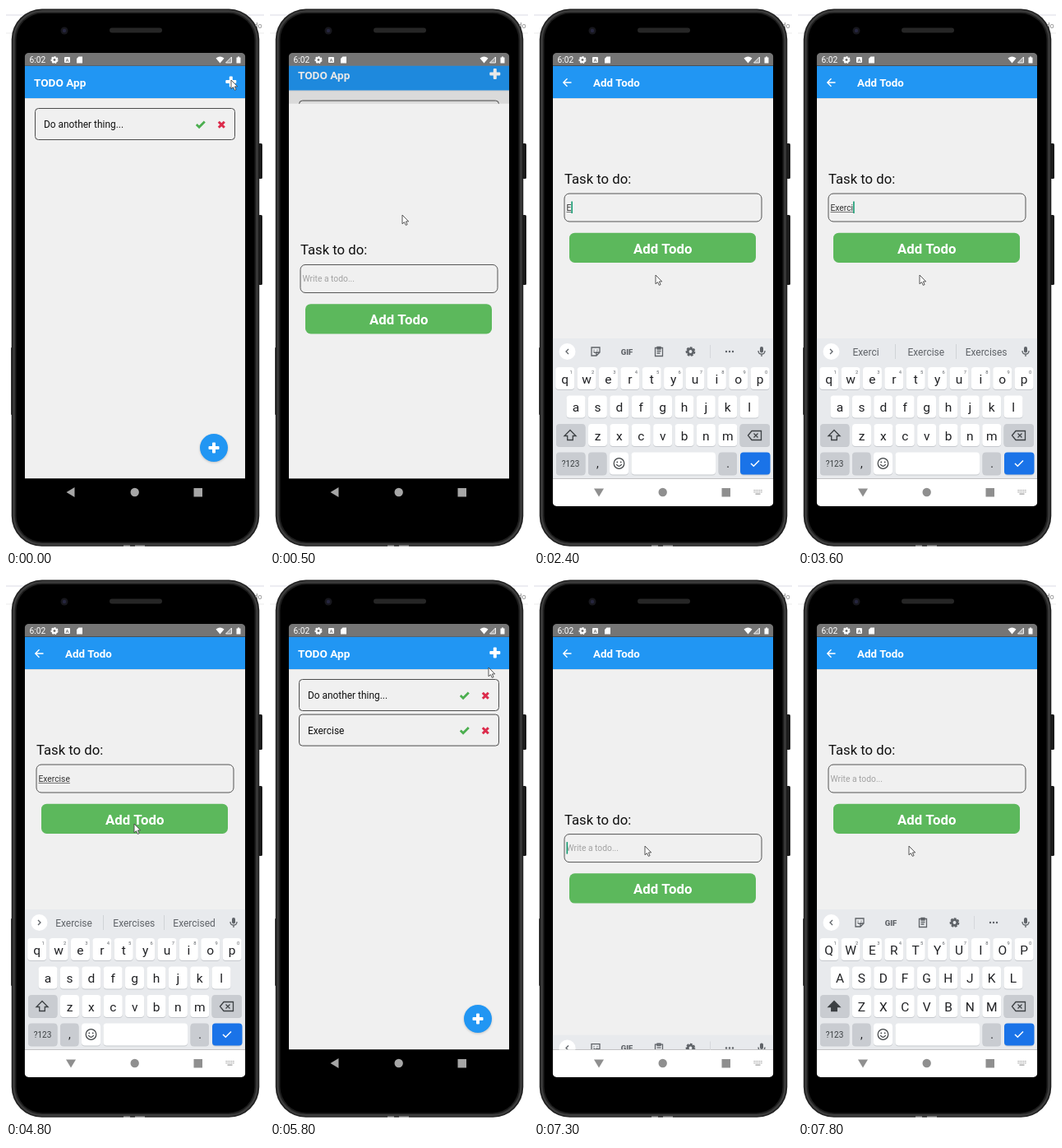
Animation, 314 px wide and 660 px high, one loop 8 s. Source, as an HTML page with a canvas:

```html
<!DOCTYPE html>
<html lang="en">
<head>
<meta charset="utf-8">
<title>Todo app demo</title>
<style>
  html, body { margin: 0; width: 100%; height: 100%; overflow: hidden; background: #fff; }
  canvas { display: block; width: 314px; height: 660px; }
</style>
</head>
<body>
<canvas id="stage"></canvas>
<script>
const LOOP = 8000, LEFT = 22.7, WIDTH = 268.6, TOP = 72.5, CARD = 502;
const BLUE = '#2196f3', PAGE = '#f0f0f0', ICON = '#5f6368';
const canvas = document.getElementById('stage');
const c = canvas.getContext('2d');
const dpr = window.devicePixelRatio || 1;
canvas.width = 314 * dpr;
canvas.height = 660 * dpr;

const visits = [
  { open: 300, focus: 1100, keys: 1200, close: 5050 },
  { open: 6268, focus: 7200, keys: 7250, close: 1e9 }
];
const typed = 'Exercise';
const typeTimes = [2400, 2600, 2950, 3300, 3450, 3600, 3700, 3900];
// time, x, y
const pointer = [
  [0, 274, 90], [200, 274, 90], [450, 161, 254], [600, 161, 254], [900, 148, 327],
  [4250, 148, 327], [4600, 156, 300], [5150, 156, 300], [5600, 238, 136],
  [5800, 266, 110], [6000, 271, 102], [6550, 271, 102], [7000, 135, 327]
];

const clamp = v => Math.max(0, Math.min(1, v));
const smooth = v => v * v * (3 - 2 * v);

// cubic-bezier(.35, .45, 0, 1)
function ease(x) {
  if (x <= 0 || x >= 1) return clamp(x);
  let lo = 0, hi = 1, s;
  for (let i = 0; i < 20; i++) {
    s = (lo + hi) / 2;
    if (1.05 * (1 - s) ** 2 * s + s ** 3 < x) lo = s; else hi = s;
  }
  return 1.35 * (1 - s) ** 2 * s + 3 * (1 - s) * s * s + s ** 3;
}

function rect(x, y, w, h, fill) {
  c.fillStyle = fill;
  c.fillRect(x, y, w, h);
}
function round(x, y, w, h, r, fill, stroke, width = 1) {
  c.beginPath();
  c.roundRect(x, y, w, h, r);
  paint(fill, stroke, width);
}
function circle(x, y, r, fill, stroke, width = 1) {
  c.beginPath();
  c.arc(x, y, r, 0, 7);
  paint(fill, stroke, width);
}
function shape(d, x, y, fill, stroke, width = 1) {
  c.save();
  c.translate(x, y);
  const p = new Path2D(d);
  if (fill) { c.fillStyle = fill; c.fill(p); }
  if (stroke) { c.strokeStyle = stroke; c.lineWidth = width; c.stroke(p); }
  c.restore();
}
function paint(fill, stroke, width) {
  if (fill) { c.fillStyle = fill; c.fill(); }
  if (stroke) { c.strokeStyle = stroke; c.lineWidth = width; c.stroke(); }
}
function text(s, x, y, size, color, weight = 400, align = 'left') {
  c.font = `${weight} ${size}px Roboto, sans-serif`;
  c.textAlign = align;
  c.fillStyle = color;
  c.fillText(s, x, y);
}
function gear(x, y, r, color) {
  c.setLineDash([r * 0.5, r * 0.285]);
  circle(x, y, r * 0.88, null, color, r * 0.3);
  c.setLineDash([]);
  circle(x, y, r * 0.58, null, color, r * 0.48);
}
function plus(x, y) {
  round(x - 6.5, y - 2, 13, 4, 1, '#fff');
  round(x - 2, y - 6.5, 4, 13, 1, '#fff');
}

function phone() {
  rect(0, 0, 314, 660, '#fff');
  rect(0, 10.5, 314, 1, '#dcdce6');
  rect(0, 32.5, 314, 1, '#ececec');
  text('do', 301.5, 27, 9, '#888');
  round(306, 167, 6, 43, 1.5, '#1b1b1b');
  round(306, 254, 6, 85, 1.5, '#1b1b1b');
  round(6, 415, 4, 82, 1, '#3a3a3a');
  round(6.7, 3.6, 301.6, 653.2, 37, '#1e1e1e');
  round(9.5, 6.2, 296, 648, 34.5, null, '#3c3c3c', 2.4);
  round(12.5, 9, 290, 642.5, 32, '#000');
  rect(143, 655.5, 8, 1.5, '#aaa');
  rect(157, 655.5, 12, 1.5, '#aaa');
  circle(71, 30, 4.5, '#17171d');
  circle(71, 30, 2.2, '#26263f');
  round(126, 26.5, 64, 6, 3, '#262626');
}

function statusBar() {
  rect(LEFT, 57, WIDTH, TOP - 57, '#757575');
  text('6:02', 28.5, 69, 10.2, '#fff');
  gear(59, 65.5, 4.4, '#fff');
  round(71, 62, 7, 7, 1, '#fff');
  text('A', 74.5, 68, 6, '#757575', 700, 'center');
  shape('M-3.5 -1.5L-1 -4H3.5V4H-3.5Z', 89.5, 65.5, '#fff');
  shape('M0 4L-5 -2Q0 -6 5 -2Z', 260.5, 65.5, '#fff');
  shape('M-3.5 3.5L3.5 -3.5V3.5Z', 271, 65.5, 'rgba(255,255,255,.35)', '#fff', 0.9);
  shape('M-2.5 -3H-1V-4H1V-3H2.5V4H-2.5Z', 283, 65.5, '#fff');
}

function header(title, x, size) {
  rect(LEFT, 112, WIDTH, 1, '#dedede');
  rect(LEFT, TOP, WIDTH, 112 - TOP, BLUE);
  text(title, x, 98, size, '#fff', 700);
}

function todo(label, y) {
  round(35.5, y + 0.5, 243, 38, 4, null, '#4c4c4c');
  text(label, 46, y + 24.2, 11.9, '#111');
  shape('M-5 0L-1.7 3.2L5 -3.5', 236.8, y + 20, null, '#4caf50', 2.8);
  shape('M-3.5 -3.5L3.5 3.5M3.5 -3.5L-3.5 3.5', 262.3, y + 20.2, null, '#dc2b4b', 3);
}

function listCard(t, p) {
  c.save();
  c.translate(0, -0.0208 * CARD * p);
  rect(LEFT, TOP, WIDTH, CARD + 20, PAGE);
  header('TODO App', 34, 13.6);
  const pressed = visits.some(v => t >= v.open - 180 && t < v.open);
  c.globalAlpha = pressed ? 0.5 : 1;
  plus(273.8, 92);
  c.globalAlpha = 1;
  todo('Do another thing...', 124);
  if (t > 5000) todo('Exercise', 166.6);
  c.save();
  c.shadowColor = 'rgba(0,0,0,.2)';
  c.shadowBlur = 3 * dpr;
  c.shadowOffsetY = dpr;
  circle(253, 537, 17, BLUE);
  c.restore();
  plus(253, 537);
  c.restore();
  rect(LEFT, TOP, WIDTH, CARD, `rgba(0,0,0,${0.1 * p})`);
}

function formCard(t, p, visit, value, lifted) {
  c.save();
  c.beginPath();
  c.rect(LEFT, TOP + CARD * (1 - p), WIDTH, CARD);
  c.clip();
  c.translate(0, 0.041 * CARD * (1 - p));
  rect(LEFT, TOP, WIDTH, CARD, PAGE);
  header('Add Todo', 72, 13.3);
  shape('M5 0H-4.5M0 -4.7L-4.7 0L0 4.7', 40.5, 93, null, '#fff', 1.4);
  if (!lifted) c.translate(0, 84.6);

  text('Task to do:', 37, 216, 16.7, '#111');
  round(37, 228, 240, 34, 6, null, '#555');
  text(value || 'Write a todo...', 39.5, 248.5, 10.3, value ? '#333' : '#a2a2a2');
  const w = value ? c.measureText(value).width : 0;
  if (value) rect(39.5, 250, w, 0.8, '#555');
  const since = Math.max(visit.focus, ...typeTimes.filter(k => k <= t && value));
  if (t >= visit.focus && t < visit.close && (t - since) % 1000 < 500)
    rect(39.5 + w, 237.5, 1.6, 14.5, '#149a70');

  c.globalAlpha = t > 4850 && t < 5150 ? 0.5 : 1;
  round(43, 275.7, 227, 36.3, 6.5, '#5cb85c');
  text('Add Todo', 156.7, 300.7, 16.8, '#fff', 700, 'center');
  c.restore();
}

function key(x, y, w, fill = '#fff') {
  round(x, y + 1, w, 27, 4, '#c6c9ce');
  round(x, y, w, 27, 4, fill);
}

function keyRow(letters, x0, y, upper, digits) {
  [...letters].forEach((ch, i) => {
    const x = x0 + i * 26.38;
    key(x - 11.5, y, 23);
    text(upper ? ch.toUpperCase() : ch, x, y + 19.5, 15.5, '#202124', 400, 'center');
    if (digits) text((i + 1) % 10, x + 7.5, y + 7.5, 5.8, ICON, 400, 'center');
  });
}

function toolbar() {
  shape('M-5 -5H5V1L1 5H-5ZM5 1H1V5M-2.5 0Q0 3 2 0M-2 -2.2V-1.2M2 -2.2V-1.2', 75, 420, null, ICON, 1.3);
  text('GIF', 113, 423.5, 9.5, ICON, 900, 'center');
  shape('M-4.5 -4.5H4.5V5.5H-4.5ZM-2 -5.5H2V-3H-2ZM-2.5 -.5H2.5M-2.5 2H1.5', 152, 420, null, ICON, 1.3);
  gear(190.5, 420, 5.7, ICON);
  rect(214, 412, 1, 16, '#d5d7db');
  for (const x of [234, 238, 242]) circle(x, 420, 1.2, ICON);
}

function suggestions(value) {
  const words = value === typed ? [typed, 'Exercises', 'Exercised'] : [value, typed, 'Exercises'];
  words.forEach((s, i) => text(s, 82.5 + i * 73.3, 424.5, 12, ICON, 400, 'center'));
  rect(118, 411, 1, 18, '#d0d3d7');
  rect(192, 411, 1, 18, '#d0d3d7');
}

function keyboard(value) {
  const upper = !value, predict = value.length > 1, grey = '#c9ccd1';
  rect(LEFT, 404, WIDTH, 171, '#e8eaed');
  circle(40.5, 420, 10, '#fff');
  shape(predict ? 'M-1.5 -3L1.5 0L-1.5 3' : 'M1.5 -3L-1.5 0L1.5 3', 40.5, 420, null, ICON, 1.3);
  if (predict) suggestions(value); else toolbar();
  round(275, 414, 4, 7.5, 2, ICON);
  shape('M-4 -1Q-4 3.2 0 3.2Q4 3.2 4 -1M0 3V6', 277, 420, null, ICON, 1.3);

  keyRow('qwertyuiop', 37.7, 439, upper, true);
  keyRow('asdfghjkl', 51, 473.5, upper);
  keyRow('zxcvbnm', 77.5, 508, upper);
  key(27, 508, 35.5, grey);
  shape('M0 -6.5L7 .5H3.3V5.5H-3.3V.5H-7Z', 44, 522, upper ? '#3c4043' : null, '#3c4043', 1.3);
  key(250.5, 508, 36.5, grey);
  shape('M-8 0L-3.5 -5.5H8V5.5H-3.5ZM-1 -2.5L4 2.5M4 -2.5L-1 2.5', 268.5, 522, null, '#3c4043', 1.3);

  key(27, 542.5, 35.5, grey);
  text('?123', 44.5, 560, 10, '#3c4043', 400, 'center');
  key(66, 542.5, 22.5, grey);
  text(',', 77.5, 561, 14, '#202124', 400, 'center');
  key(92, 542.5, 23);
  circle(103.5, 556, 6.3, null, '#3c4043', 1.2);
  shape('M-3.2 1.2Q0 5.5 3.2 1.2', 103.5, 556, null, '#3c4043', 1.2);
  circle(101.3, 554.3, 0.9, '#3c4043');
  circle(105.7, 554.3, 0.9, '#3c4043');
  key(118.5, 542.5, 102.5);
  key(224.5, 542.5, 22.5, grey);
  text('.', 236, 561, 14, '#202124', 400, 'center');
  key(251, 542.5, 36.5, '#1a73e8');
  shape('M-5 0L-1.7 3.2L5 -3.5', 269, 556, null, '#fff', 1.5);
}

function navBar(light) {
  rect(LEFT, TOP + CARD, WIDTH, 35, light ? '#fff' : '#000');
  const color = light ? '#8f8f8f' : '#a6a6a6';
  shape(light ? 'M-6 -4.5H6L0 5.5Z' : 'M4.5 -6V6L-5.5 0Z', 79, 591, color);
  circle(156.7, 591, 5.2, color);
  rect(228.5, 586, 10.5, 10.5, color);
  if (!light) return;
  for (let i = 0; i < 5; i++) {
    rect(267.5 + i * 2.2, 588, 1.2, 1.2, '#999');
    rect(267.5 + i * 2.2, 590.2, 1.2, 1.2, '#999');
  }
  rect(269.5, 592.5, 6, 1.2, '#999');
}

function mouse(t) {
  let i = pointer.findIndex(k => k[0] > t);
  if (i < 0) i = pointer.length;
  const a = pointer[i - 1], b = pointer[i] || a;
  const f = b === a ? 0 : smooth((t - a[0]) / (b[0] - a[0]));
  shape('M0 0V10.8L2.5 8.6L4.3 12.4L6.1 11.6L4.4 7.9H7.7Z',
    a[1] + (b[1] - a[1]) * f, a[2] + (b[2] - a[2]) * f, '#fff', '#444', 0.9);
}

function draw(t) {
  c.setTransform(dpr, 0, 0, dpr, 0, 0);
  phone();
  const visit = visits[t < 6000 ? 0 : 1];
  const p = ease((t - visit.open) / 425) - ease((t - visit.close) / 425);
  const keys = smooth(clamp((t - visit.keys) / 250)) - smooth(clamp((t - visit.close) / 200));
  const value = t < 6000 ? typed.slice(0, typeTimes.filter(k => k <= t).length) : '';

  c.save();
  c.beginPath();
  c.roundRect(LEFT, 57, WIDTH, 551, 5);
  c.clip();
  c.save();
  c.beginPath();
  c.rect(LEFT, TOP, WIDTH, CARD);
  c.clip();
  if (p < 1) listCard(t, p);
  if (p > 0) formCard(t, p, visit, value, keys > 0.4);
  if (keys > 0) {
    c.translate(0, 171 * (1 - keys));
    keyboard(value);
  }
  c.restore();
  statusBar();
  navBar(keys > 0);
  c.restore();
  mouse(t);
}

const start = performance.now();
function frame() {
  draw((performance.now() - start) % LOOP);
  requestAnimationFrame(frame);
}
frame();
</script>
</body>
</html>
```
